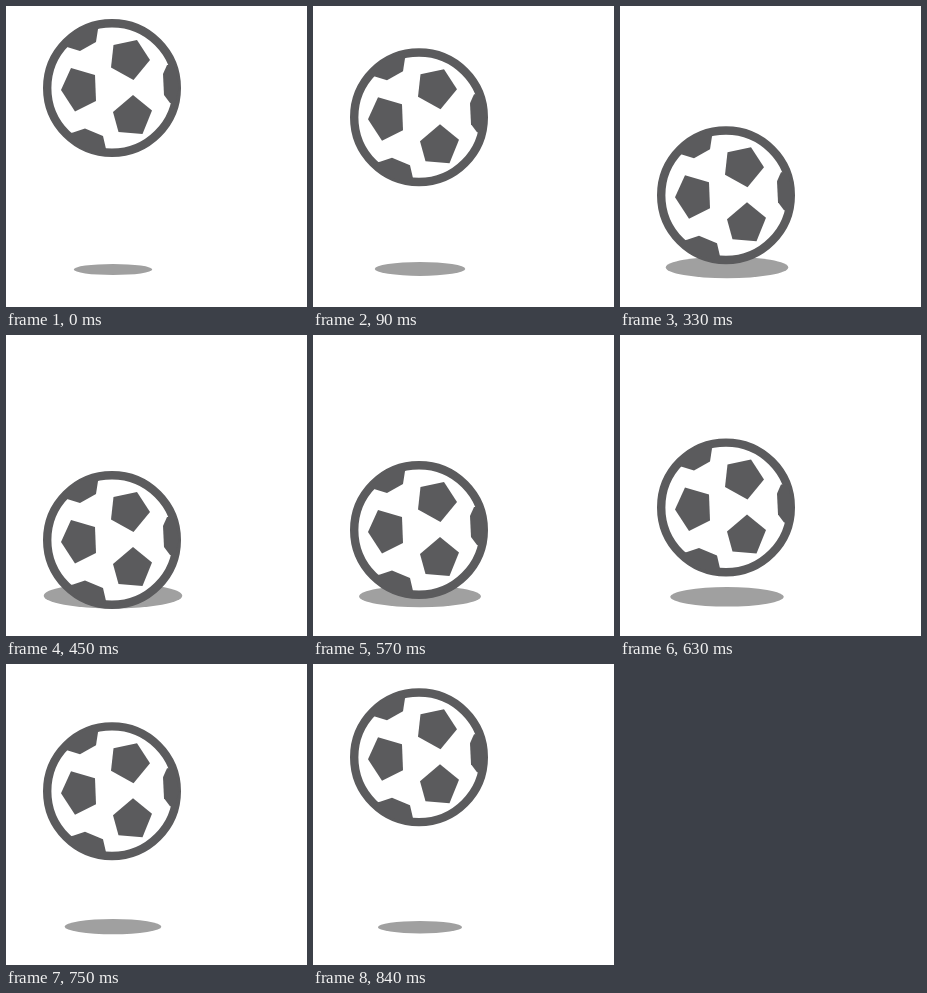
An HTML page for the animation above (0.87 s loop, 301x301 px).

```html
<!DOCTYPE html>
<html lang="en">
<head>
<meta charset="utf-8">
<title>Bouncing football</title>
<style>
  html, body { margin: 0; width: 100%; height: 100%; overflow: hidden; background: #fff; }
  svg { display: block; width: 100%; height: 100%; }
</style>
</head>
<body>
<svg viewBox="0 0 301 301">
  <ellipse id="shadow" cx="107" fill="#a0a0a0"/>
  <g id="ball" fill="#5b5b5d">
    <circle cx="106" cy="69" r="64.8" fill="#fff" stroke="#5b5b5d" stroke-width="8.4"/>
    <g transform="translate(0 -13)">
      <!-- whole patches -->
      <path d="M107.5 39 131 34 144 54 127.5 74 105 61.5Z"/>
      <path d="M65 62 89 69 90 95 69 105.5 55 84Z"/>
      <path d="M127 89 146 104.5 136.500 128 112.500 126 107 106Z"/>
      <!-- patches cut by the rim -->
      <path d="M92 23 90 36 74 45 61 41 56 36 70 24 88 18Z"/>
      <path d="M67 126.500 79 122.500 97 130 100 143 96 147 76 142 60 128Z"/>
      <path d="M161 59 157 68 158 89 164 97 169 97 173 82 168 59Z"/>
    </g>
  </g>
</svg>
<script>
  const LOOP = 870, STEP = 30, TOP = 13, FLOOR = 136, TURN = 15;
  const ball = document.getElementById('ball');
  const shadow = document.getElementById('shadow');

  function draw(ms) {
    const k = Math.floor((ms % LOOP) / STEP);
    const falling = k <= TURN;

    // steady fall, short rest on the ground, faster rise
    const y = Math.min(FLOOR, TOP + (falling ? 9.75 * k : 11.3 * (29 - k)));
    ball.setAttribute('transform', `translate(0 ${y})`);

    const grow = falling ? k / TURN : (29.35 - k) / 14.35;
    shadow.setAttribute('rx', 39.25 + 30 * grow);
    shadow.setAttribute('ry', 5.5 + 7.3 * grow);
    shadow.setAttribute('cy', 263.5 - 2.8 * grow);
  }

  const start = performance.now();
  function tick() {
    draw(performance.now() - start);
    requestAnimationFrame(tick);
  }
  tick();
</script>
</body>
</html>
```
